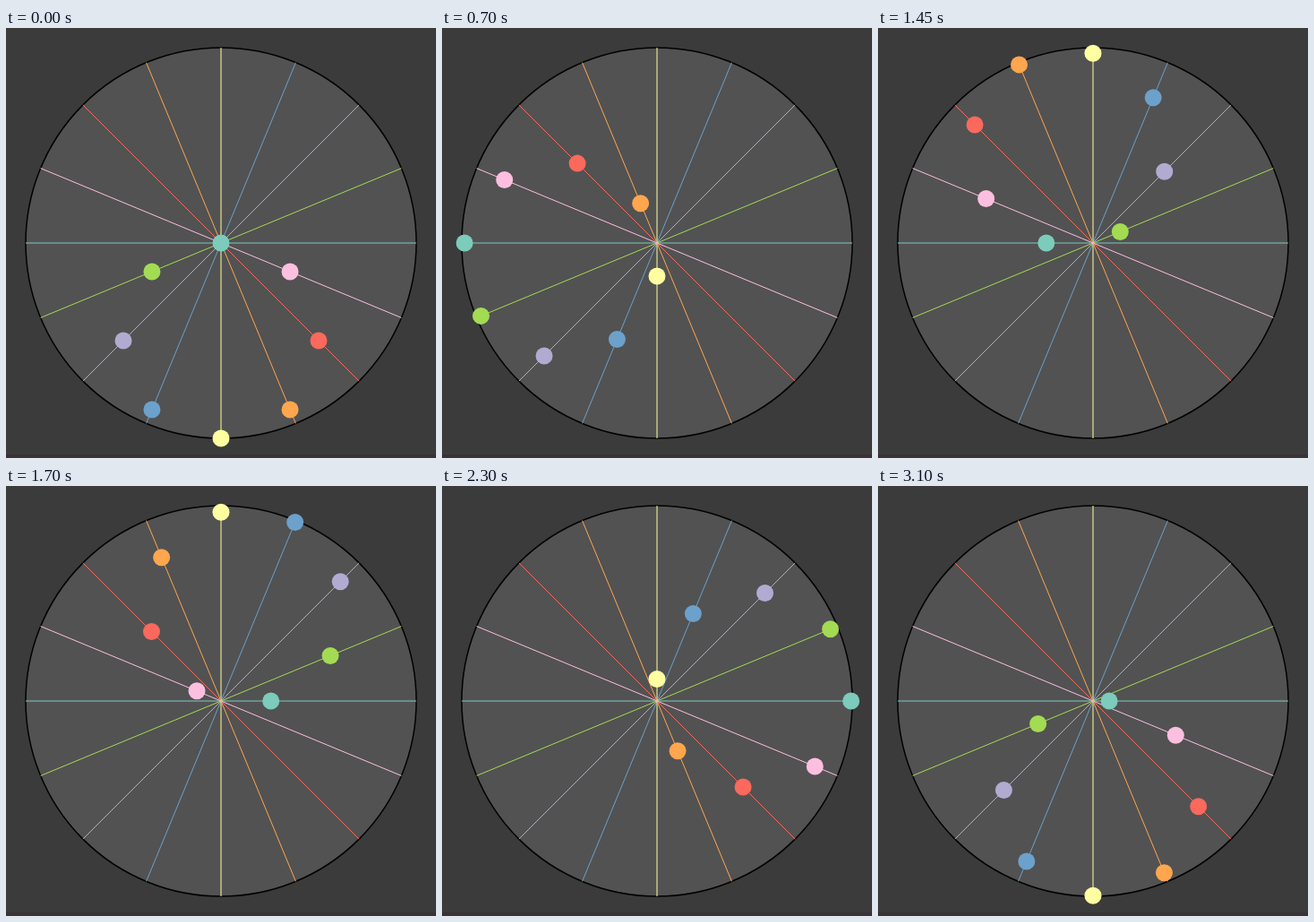
An HTML page with a canvas that plays this animation: 480x480 px, repeating every 3.15 s.

```html
<!DOCTYPE html>
<html>
<head>
<meta charset="utf-8">
<title>Straight lines on a wheel</title>
<style>
  html, body { margin: 0; width: 100%; height: 100%; overflow: hidden; background: #3b3b3b; }
  canvas { display: block; }
</style>
</head>
<body>
<canvas id="stage" width="480" height="480"></canvas>
<script>
const ctx = document.getElementById('stage').getContext('2d');
const C = 240, R = 218, DOT = 9.5, STEP = 50, STEPS = 63;
const colors = ['#7ccbbb', '#a3db53', '#b1abd2', '#6ca1cb',
                '#ffffa1', '#ffa64e', '#fa695c', '#fdbfe0'];
const spokes = colors.map((color, i) => {
  const angle = -i * Math.PI / colors.length;
  return { color, angle, x: Math.cos(angle), y: Math.sin(angle) };
});

function disc(x, y, r, fill) {
  ctx.beginPath();
  ctx.arc(x, y, r, 0, 2 * Math.PI);
  ctx.fillStyle = fill;
  ctx.fill();
}

function draw(phase) {
  ctx.fillStyle = '#3b3b3b';
  ctx.fillRect(0, 0, 480, 480);
  ctx.fillStyle = '#3a3236';
  ctx.fillRect(0, 476, 480, 4);

  disc(C, C, R, '#525252');
  ctx.strokeStyle = '#000';
  ctx.lineWidth = 1.5;
  ctx.stroke();

  ctx.lineWidth = 1;
  for (const { color, x, y } of spokes) {
    ctx.beginPath();
    ctx.moveTo(C - R * x, C - R * y);
    ctx.lineTo(C + R * x, C + R * y);
    ctx.strokeStyle = color;
    ctx.stroke();
  }

  // Each dot is the projection of one rotating point onto its spoke.
  for (const { color, angle, x, y } of spokes) {
    const d = R * Math.cos(phase - angle);
    disc(C + d * x, C + d * y, DOT, color);
  }
}

const start = performance.now();
function tick() {
  const step = Math.floor((performance.now() - start) / STEP) % STEPS;
  draw(Math.PI / 2 + step * 0.1);
  requestAnimationFrame(tick);
}
tick();
</script>
</body>
</html>
```
